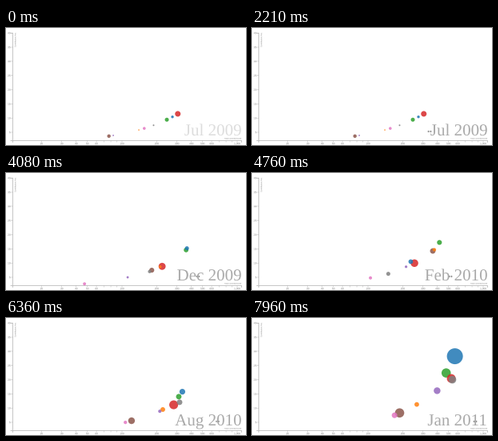
Write a matplotlib script that moves like this. It is 300x147 px and loops after 8 s.

```python
import numpy as np
import matplotlib.pyplot as plt
from matplotlib.animation import FuncAnimation
from matplotlib.patches import Circle, PathPatch, Polygon
from matplotlib.path import Path
from matplotlib.textpath import TextPath

W, H, DPI = 300, 147, 100
STEP, LOOP = 40, 8000
PT = 72 / DPI  # points per pixel
AXIS, TICK_TEXT = "#b8b8b8", "#808080"
MONTHS = "Jan Feb Mar Apr May Jun Jul Aug Sep Oct Nov Dec".split()

# Stops of the pointer as it scrubs along the date label
TIMES = [2210, 3350, 4760, 6360, 7240, 7960]
POINTER_X = [222, 231, 248, 264.5, 271.5, 279]

# Leaders first: reach at each stop, final yield, radius at first and last two
BUBBLES = {
    "#1f77b4": ([274, 288, 235, 334, 414, 568], 1.20, [1.7, 4, 10]),
    "#2ca02c": ([245, 237, 417, 311, 345, 477], 1.12, [2.5, 3.6, 5.8]),
    "#d62728": ([305, 184, 253, 281, 396, 528], 0.92, [3.5, 6, 5.5]),
    "#7f7f7f": ([188, 203, 150, 316, 429, 540], 0.88, [1, 4, 4.8]),
    "#9467bd": ([84, 56, 214, 213, 179, 398], 0.95, [0.9, 2.3, 4.2]),
    "#ff7f0e": ([140, 124, 377, 226, 239, 265], 0.97, [0.8, 3.4, 2.9]),
    "#8c564b": ([77, 111, 365, 121, 264, 188], 0.97, [2.2, 4.6, 5.8]),
    "#e377c2": ([156, 41, 105, 107, 151, 170], 0.95, [1.8, 2.2, 3.5]),
}
# Between stops the leaders surge and the stragglers drop back (in decades)
SWING = dict(zip(BUBBLES, 0.15 * np.linspace(1, -1, len(BUBBLES)) ** 3))

fig = plt.figure(figsize=(W / DPI, H / DPI), dpi=DPI, facecolor="white")
ax = fig.add_axes([0, 0, 1, 1])
ax.set(xlim=(0, W), ylim=(H, 0))
ax.axis("off")


def scale_x(value):
    return 145 + 144 * np.log10(value / 100)


def scale_y(value):
    return 131 - 3.565 * (value - 5)


def line(xs, ys, width=0.8):
    ax.plot(xs, ys, color=AXIS, lw=width * PT, zorder=1, snap=False)


def glyphs(s, size, font="Liberation Sans"):
    return TextPath((0, 0), s, size=size, prop={"family": font})


def place(path, x, y, upright=True):
    u, v = path.vertices.T
    points = (x + u, y - v) if upright else (x - v, y - u)
    return Path(np.column_stack(points), path.codes)


def text(x, y, s, size, align=0.5, upright=True):
    path = glyphs(s, size)
    if upright:
        x -= align * path.get_extents().x1
    ax.add_patch(PathPatch(place(path, x, y, upright), facecolor=TICK_TEXT,
                           lw=0, zorder=2))


def draw_axes():
    line([6, 8.5, 8.5, 6], [6.5, 6.5, 141.5, 141.5])
    line([8.5, 8.5, 294.5, 294.5], [143.5, 141.5, 141.5, 143.5])
    for v in range(5, 41, 5):
        y = scale_y(v)
        line([6.3, 8.5], [y, y], 0.5)
        text(5.5, y + 1.2, str(v), 3.2, align=1)
    for v in [*range(20, 100, 10), *range(100, 1001, 100)]:
        x = scale_x(v)
        line([x, x], [141.5, 143.3], 0.5)
        if not (60 < v < 100 or 600 < v < 1000):
            text(x, 146.2, f"{v:,}", 3.2)
    text(294, 139.6, "Total commits/month", 2.3, align=1)
    text(12.4, 24, "Contributors /mo.", 2.4, upright=False)


def year_path(month):
    s = f"{MONTHS[month % 12]} {2009 + month // 12}"
    font = "Liberation Serif"
    # A final zero fixes the right edge whatever the last digit is
    right = glyphs(s[:-1] + "0", 21, font).get_extents().x1
    return place(glyphs(s, 21, font), 293.8 - right, 135)


def bubble(color, t):
    reach, final_yield, radii = BUBBLES[color]
    stop = np.interp(t, TIMES, range(len(TIMES)))
    swing = SWING[color] * np.sin(np.pi * (stop % 1))
    decades = np.interp(t, TIMES, np.log10(reach)) + swing
    people = 10 ** decades
    rate = np.interp(t, [TIMES[0], TIMES[-1]], [0.86, final_yield])
    radius = np.interp(t, [TIMES[0], *TIMES[-2:]], radii)
    return scale_x(people), scale_y(1 + rate * people / 25), radius


draw_axes()
label = PathPatch(year_path(6), lw=0, zorder=2)
ax.add_patch(label)
dots = {c: Circle((0, 0), 1, facecolor=c, lw=0, alpha=0.85) for c in BUBBLES}
for dot in dots.values():
    ax.add_patch(dot)

ARROW = np.array([(0, 0), (0, 4.2), (1.2, 3.2), (3, 3)])
HALF = np.array([(2.7, 0), (1.1, 1.4), (1.1, 0.4)])
RESIZE = np.vstack([HALF, HALF[::-1] * [-1, 1], -HALF, HALF[::-1] * [1, -1]])
pointer = Polygon(ARROW, facecolor="#444444", edgecolor="white",
                  lw=0.3 * PT, zorder=40)
ax.add_patch(pointer)


def draw(i):
    t = i * STEP
    active = t >= 2000
    pointer_x = np.interp(t, TIMES, POINTER_X)
    label.set_path(year_path(6 + max(0, int((pointer_x - 224) / 3.05))))
    label.set_facecolor("#aaaaaa" if active else "#dddddd")

    for color, dot in dots.items():
        x, y, r = bubble(color, t)
        dot.set(center=(x, y), radius=r, zorder=20 - r)

    pointer.set_visible(t >= 1180)
    if active:
        pointer.set_xy(RESIZE + (pointer_x, 130))
    else:
        u = np.clip((t - 1180) / 730, 0, 1)
        pointer.set_xy(ARROW + (218 + 3 * u, 146 - 16 * u))
    return [label, pointer, *dots.values()]


anim = FuncAnimation(fig, draw, frames=LOOP // STEP, interval=STEP,
                     repeat=True, repeat_delay=0)
plt.show()
```
